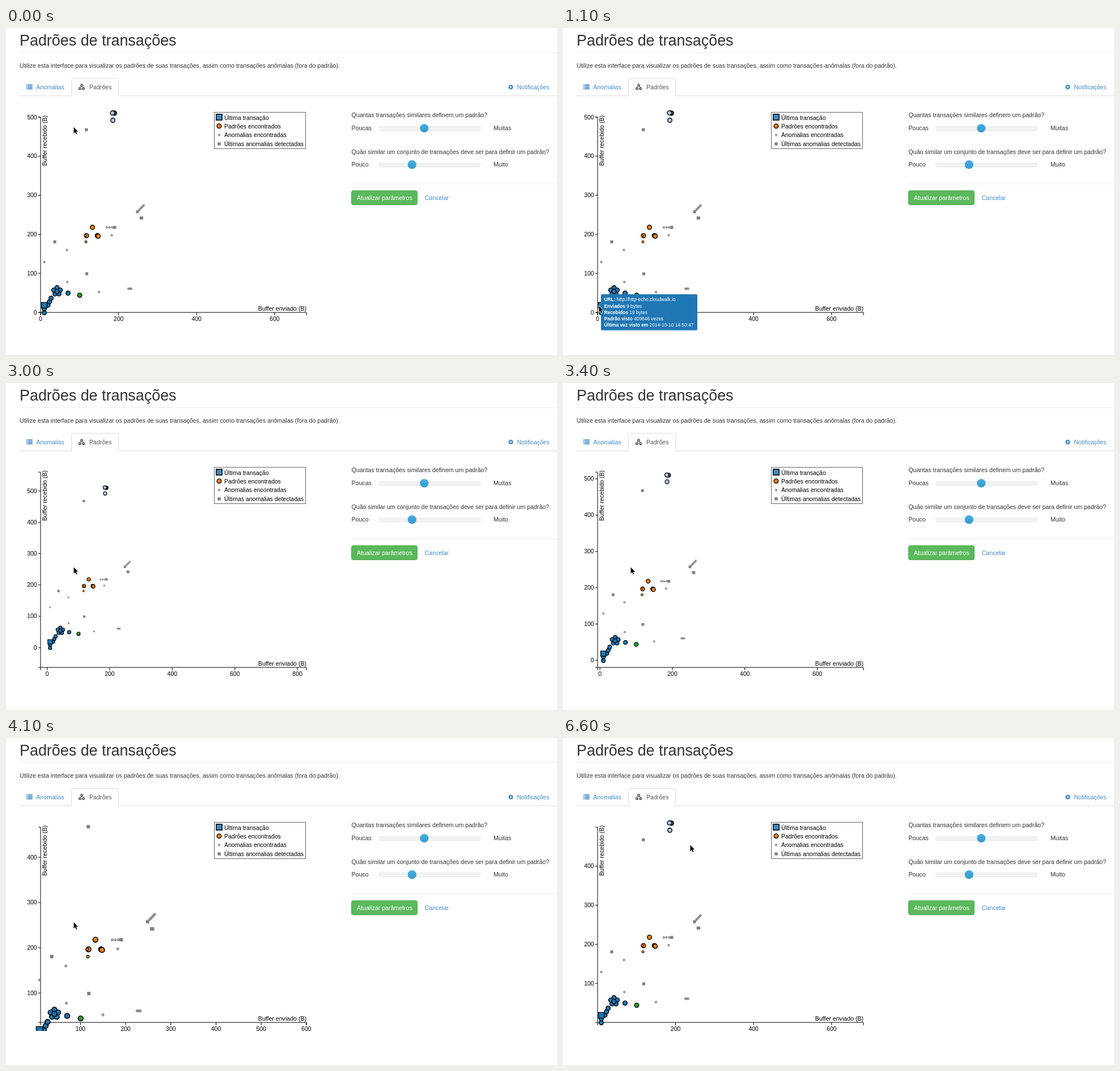
An HTML page with a canvas that plays this animation: 972x576 px, repeating every 6.7 s.

```html
<!DOCTYPE html>
<html lang="pt">
<head>
<meta charset="utf-8">
<title>Padrões de transações</title>
<style>
html, body { margin: 0; width: 100%; height: 100%; overflow: hidden; background: #fff; }
canvas { display: block; width: 972px; height: 576px; }
</style>
</head>
<body>
<canvas id="stage" width="972" height="576"></canvas>
<script>
const ctx = document.getElementById('stage').getContext('2d');
const LOOP = 6700, STEP = 100, WHEEL = 2 ** 0.106, TAU = Math.PI * 2;
const FONT = '"Liberation Sans", Arial, sans-serif';
const LINK = '#428bca', BLUE = '#1f77b4', PALE = '#aec7e8', ORANGE = '#ff7f0e', GREEN = '#2ca02c';
const DOT = 'rgba(128,128,128,.8)', SQUARE = '#808080';
const PLOT = { left: 61, right: 530, top: 157, bottom: 501, unit: 0.688 };

const tipLines = [
  ['URL:', 'http://http-echo.cloudwalk.io'],
  ['Enviados', '9 bytes'],
  ['Recebidos', '19 bytes'],
  ['Padrão visto', '409846 vezes'],
  ['Última vez visto em', '2014-10-10 14:50:47'],
  ['Primeira vez visto em', '2014-10-08 09:12:30'],
  ['Intervalo médio entre transações', '43,25 segundos']
];

// Pointer legs: first step, last step, destination.
const legs = [
  { from: 7, to: 11, x: 63.5, y: 489.5 },
  { from: 24, to: 27, x: 119.5, y: 324.5 },
  { from: 43, to: 47, x: 375, y: 175.5 },
  { from: 56, to: 57, x: 375, y: 188.5 },
  { from: 64, to: 66, x: 224.5, y: 188.5 }
];

const clamp01 = v => Math.min(1, Math.max(0, v));
const tent = (s, mid, peak) => Math.max(0, peak - Math.abs(s - mid));
const within = (s, a, b) => s >= a && s < b;

function row(n, x, y, dx, dy, each) {
  for (let i = 0; i < n; i++) each(x + i * dx, y + i * dy);
}

function ring(n, x, y, r) {
  return Array.from({ length: n }, (_, i) => {
    const a = i * TAU / n - TAU / 4;
    return [x + r * Math.cos(a), y + r * Math.sin(a)];
  });
}

function text(str, x, y, color = '#333', size = 10.6, align = 'left', weight = '') {
  ctx.font = `${weight} ${size}px ${FONT}`;
  ctx.fillStyle = color;
  ctx.textAlign = align;
  ctx.fillText(str, x, y);
}

function paint(fill, stroke, width = 1) {
  if (fill) { ctx.fillStyle = fill; ctx.fill(); }
  if (stroke) { ctx.strokeStyle = stroke; ctx.lineWidth = width; ctx.stroke(); }
}

function line(color, ...pts) {
  ctx.beginPath();
  pts.forEach(p => ctx.lineTo(...p));
  paint(null, color);
}

function poly(pts) {
  ctx.beginPath();
  pts.forEach(p => ctx.lineTo(...p));
  ctx.closePath();
}

function box(x, y, w, h, r, fill, stroke) {
  ctx.beginPath();
  ctx.roundRect(x, y, w, h, r);
  paint(fill, stroke);
}

function disc(x, y, r, fill, stroke, width) {
  ctx.beginPath();
  ctx.arc(x, y, r, 0, TAU);
  paint(fill, stroke, width);
}

function mark(x, y, size, fill, stroke) {
  ctx.beginPath();
  ctx.rect(x - size / 2, y - size / 2, size, size);
  paint(fill, stroke, 1.4);
}

function gradient(y0, y1, a, b) {
  const g = ctx.createLinearGradient(0, y0, 0, y1);
  g.addColorStop(0, a);
  g.addColorStop(1, b);
  return g;
}

function slider(y, thumb, from, to) {
  text(from, 609.5, y + 3.3);
  text(to, 860, y + 3.3);
  box(657, y - 3.5, 181, 7.5, 3, gradient(y - 3.5, y + 4, '#ececec', '#f9f9f9'));
  line('#dcdcdc', [659, y + 3.6], [836, y + 3.6]);
  disc(thumb, y, 7.6, gradient(y - 8, y + 8, '#43afe5', '#3699cb'));
}

function icons() {
  ctx.fillStyle = LINK;
  row(4, 36, 99.3, 0, 2.4, (x, y) => {
    ctx.fillRect(x, y, 1.7, 1.6);
    ctx.fillRect(x + 2.5, y, 8.3, 1.6);
  });
  for (const [x, y] of ring(3, 133.5, 104.7, 3.6)) {
    poly(ring(6, x, y, 3));
    paint('#555');
    line('#fff', [x - 2, y - 1], [x, y], [x + 2, y - 1]);
  }
  for (const [x, y] of ring(8, 890.5, 104, 4.3)) {
    ctx.beginPath();
    ctx.moveTo(890.5, 104);
    ctx.lineTo(x, y);
    paint(null, LINK, 2);
  }
  disc(890.5, 104, 3.4, LINK);
  disc(890.5, 104, 1.4, '#fff');
}

function page() {
  ctx.fillStyle = '#fff';
  ctx.fillRect(0, 0, 972, 576);
  text('Padrões de transações', 24, 31, '#333', 26.9);
  line('#eee', [24, 43.5], [972, 43.5]);
  text('Utilize esta interface para visualizar os padrões de suas transações, assim como transações anômalas (fora do padrão).', 24, 69.5);

  line('#ddd', [24, 119.5], [115.5, 119.5]);
  line('#ddd', [198.5, 119.5], [972, 119.5]);
  ctx.beginPath();
  ctx.moveTo(115.5, 120);
  ctx.arcTo(115.5, 88.5, 150, 88.5, 3);
  ctx.arcTo(198.5, 88.5, 198.5, 120, 3);
  ctx.lineTo(198.5, 120);
  paint(null, '#ddd');
  text('Anomalias', 53.3, 107.7, LINK);
  text('Padrões', 147, 107.7, '#555');
  text('Notificações', 901.5, 107.7, LINK, 10.5);
  icons();

  text('Quantas transações similares definem um padrão?', 609.5, 157.3);
  slider(176.5, 737.8, 'Poucas', 'Muitas');
  text('Quão similar um conjunto de transações deve ser para definir um padrão?', 609.5, 221.5);
  slider(240.7, 716.3, 'Pouco', 'Muito');
  line('#eee', [609.5, 274.5], [972, 274.5]);
  box(609.5, 286.5, 116, 25, 3, '#5cb85c', '#4cae4c');
  text('Atualizar parâmetros', 619, 303, '#fff');
  text('Cancelar', 738.7, 303, LINK);
}

// Drag out and back, then wheel out, back, in and back around the pointer.
function getView(s) {
  const pan = tent(s, 3, 3) / 3;
  if (pan) return { k: 1, dx: 44 * pan, dy: 18 * pan };
  const k = WHEEL ** (tent(s, 39, 4) - tent(s, 31, 4));
  return { k, dx: 119.5 * (1 - k), dy: 324.5 * (1 - k) };
}

function ticks(lo, hi) {
  const step = 500 / (hi - lo) <= 0.75 ? 200 : 100;
  const out = [];
  for (let v = Math.ceil(lo / step) * step; v <= hi; v += step) out.push(v);
  return out;
}

function axes(view, s) {
  const { left, right, top, bottom, unit } = PLOT;
  const sx = v => (left + v * unit) * view.k + view.dx;
  const sy = v => (bottom - v * unit) * view.k + view.dy;
  const ux = p => ((p - view.dx) / view.k - left) / unit;
  const uy = p => (bottom - (p - view.dy) / view.k) / unit;
  // Zooming back leaves the domain just short of its end values.
  const edge = s >= 35 ? -0.01 : 0.01;

  line('#000', [left - 4, top], [left, top], [left, bottom], [left - 4, bottom]);
  line('#000', [left, bottom + 5], [left, bottom], [right, bottom], [right, bottom + 5]);
  for (const v of ticks(ux(left) - edge, ux(right) + edge)) {
    const x = sx(v);
    line('#000', [x, bottom], [x, bottom + 5]);
    text(v, x, 515.8, '#000', 10.5, 'center');
  }
  for (const v of ticks(uy(bottom) - edge, uy(top) + edge)) {
    const y = sy(v);
    line('#000', [left - 4, y], [left, y]);
    text(v, 54.7, y + 3.5, '#000', 10.5, 'right');
  }
  text('Buffer enviado (B)', 530, 498.3, '#000', 10.6, 'right');
  ctx.save();
  ctx.translate(72.3, 154);
  ctx.rotate(-TAU / 4);
  text('Buffer recebido (B)', 0, 0, '#000', 10.6, 'right');
  ctx.restore();
}

function anomalyDots() {
  const dot = (x, y) => disc(x, y, 2.2, DOT);
  row(3, 178, 351.2, 4.8, 0, dot);
  row(3, 216, 459.3, 2.4, 0, dot);
  row(5, 235, 320.5, 1.95, -2, dot);
  row(2, 107.5, 391, 0.7, 56.5, dot);
  row(2, 164, 465.3, 22.5, -100.3, dot);
  dot(67.5, 412.3);
}

function anomalySquares() {
  const square = (x, y) => mark(x, y, 5.2, SQUARE);
  row(2, 141.7, 179.2, 0.8, 253.8, square);
  row(2, 238.2, 334.7, 1.3, 0, square);
  row(2, 152.5, 351.2, 39.3, 0, square);
  row(2, 86, 376.7, 146, -53, square);
}

function patternCircles() {
  const circle = (color, r = 3.8, w = 1.4) => (x, y) => disc(x, y, r, color, '#000', w);
  const blue = circle(BLUE), pale = circle(PALE), orange = circle(ORANGE);
  row(2, 67.5, 501.5, 0, -7, blue);
  row(3, 74, 488, 2.8, -6, blue);
  ring(5, 90, 463.5, 6).forEach(p => blue(...p));
  row(2, 90, 464, 19.5, 3, blue);
  row(3, 191.5, 150, -1.85, -0.2, pale);
  pale(188.5, 162.5);
  row(2, 152.5, 351, -10.5, 14.7, orange);
  row(3, 161.2, 365.7, 0.7, 0.5, orange);
  row(2, 140, 365.7, 1, 11, circle(ORANGE, 2.1, 1));
  circle(GREEN)(130, 470.7);
}

function points(view, s) {
  ctx.save();
  ctx.beginPath();
  ctx.rect(46, 142, 500, 374);
  ctx.clip();
  ctx.translate(view.dx, view.dy);
  ctx.scale(view.k, view.k);
  if (!within(s, 58, 64)) anomalyDots();
  anomalySquares();
  if (!within(s, 48, 54)) patternCircles();
  mark(67.5, 488.4, 10, BLUE, '#000');
  ctx.restore();
}

function legend() {
  box(367.5, 148.5, 161, 64, 0, '#fff', '#666');
  const items = [
    ['Última transação', (x, y) => mark(x, y, 10.4, '#438bc0', '#000')],
    ['Padrões encontrados', (x, y) => disc(x, y, 3.8, ORANGE, '#000', 1.4)],
    ['Anomalias encontradas', (x, y) => disc(x, y, 2.2, DOT)],
    ['Últimas anomalias detectadas', (x, y) => mark(x, y, 5.4, SQUARE)]
  ];
  items.forEach(([label, symbol], i) => {
    symbol(376, 157 + i * 15.7);
    text(label, 385, 162.3 + i * 14.1 + i * i * 0.35, '#000', 10.5);
  });
}

function tooltip(s) {
  if (!within(s, 11, 25)) return;
  const full = s >= 18;
  box(67, 469, full ? 208 : 170, full ? 86 : 63.5, 2, BLUE);
  tipLines.slice(0, full ? 7 : 5).forEach(([name, value], i) => {
    const y = 481.3 + i * 11.25;
    text(name, 72.5, y, '#fff', 8.4, 'left', 'bold');
    const w = ctx.measureText(name + ' ').width;
    text(value, 72.5 + w, y, '#fff', 8.4);
  });
}

function pointerAt(s, view) {
  let x = 119.5, y = 174.5;
  for (const leg of legs) {
    const p = clamp01((s - leg.from) / (leg.to - leg.from));
    x += (leg.x - x) * p;
    y += (leg.y - y) * p;
  }
  return s < 6 ? [x + view.dx, y + view.dy] : [x, y];
}

function pointer(s, view) {
  ctx.save();
  ctx.translate(...pointerAt(s, view));
  if (within(s, 47, 65)) {
    ctx.rotate(-TAU / 8);
    box(-2.4, 1.2, 2.6, 8, 1.3, '#fff', '#333');
    box(-2.4, 6, 6.2, 6, 2, '#fff', '#333');
    ctx.fillStyle = '#fff';
    ctx.fillRect(-1.9, 5, 1.6, 3);
  } else {
    poly([[0, 0], [0, 11], [2.5, 8.7], [4.3, 12.6], [6, 11.9], [4.2, 8.1], [7.5, 8]]);
    paint(null, '#fff', 1.4);
    paint('#000');
  }
  ctx.restore();
}

function draw(now) {
  const s = Math.floor(now % LOOP / STEP);
  const view = getView(s);
  page();
  axes(view, s);
  points(view, s);
  legend();
  tooltip(s);
  pointer(s, view);
}

let start;
function tick(now) {
  start ??= now;
  draw(now - start);
  requestAnimationFrame(tick);
}
draw(0);
requestAnimationFrame(tick);
</script>
</body>
</html>
```
